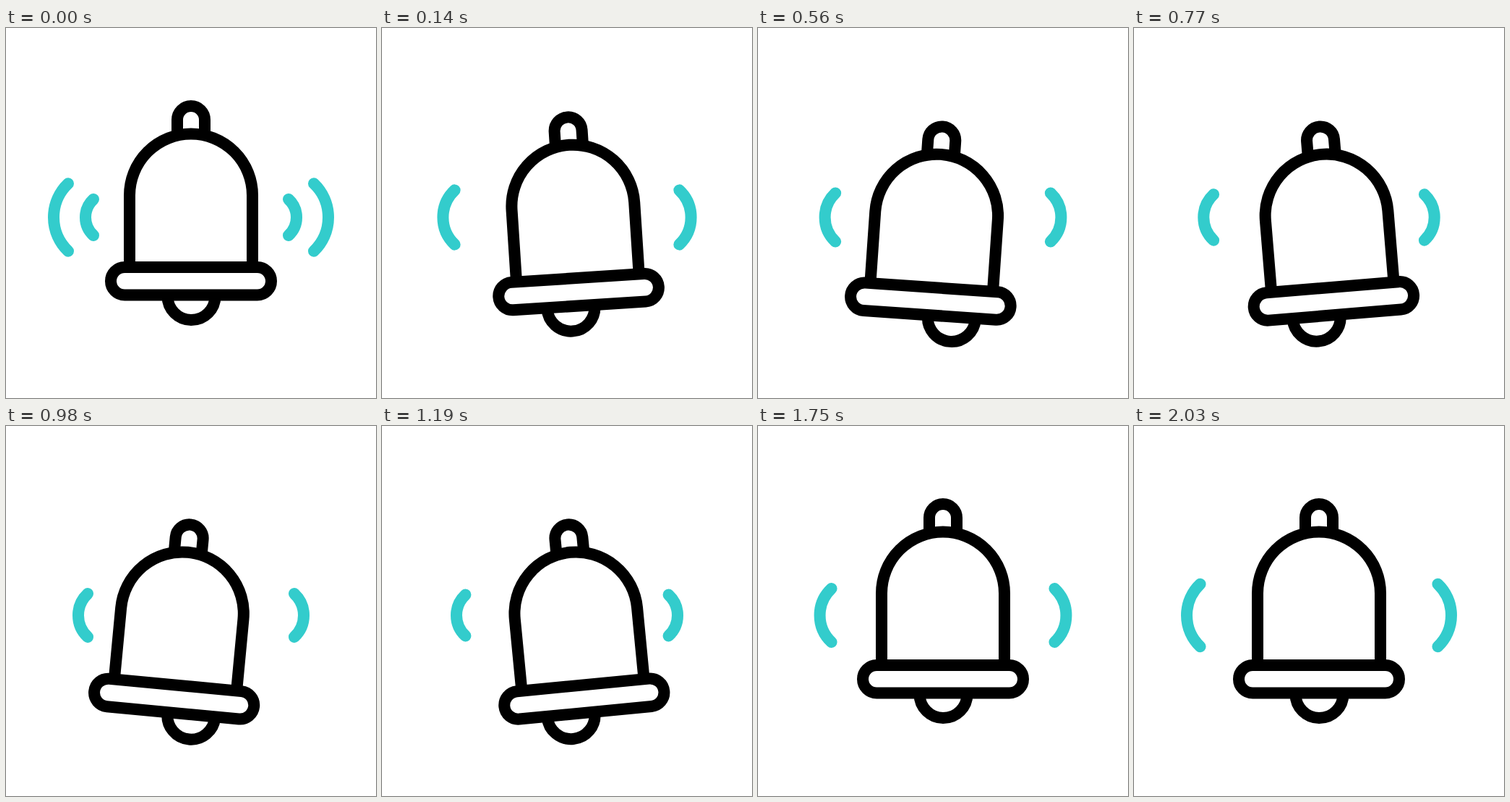
Animation, 512 px wide and 512 px high, one loop 2100 ms. Source, as an HTML page:

```html
<!DOCTYPE html>
<html lang="en">
<head>
<meta charset="utf-8">
<title>Ringing bell</title>
<style>
  html, body { margin: 0; width: 100%; height: 100%; overflow: hidden; background: #fff; }
  svg { display: block; width: 100%; height: 100%; }
</style>
</head>
<body>
<svg viewBox="0 0 512 512" fill="none" stroke-width="16">
  <path id="waves" stroke="#33cccc" stroke-linecap="round"/>
  <g id="bell" stroke="#000">
    <path id="clapper" d="M223.5 369V371A33 33 0 0 0 289.5 371V369"/>
    <path d="M237 147V127A19 19 0 0 1 275 127V147"/>
    <path d="M171 331V231.500A85 85 0 0 1 341 231.500V331"/>
    <rect x="145" y="331" width="222" height="38.500" rx="19.250"/>
  </g>
</svg>
<script>
const STEP = 70, STEPS = 30, TRAVEL = 44;
const byId = id => document.getElementById(id);
const bell = byId('bell'), clapper = byId('clapper'), waves = byId('waves');

// Tracks are [step, value] keys.
const drop = [[0, 0], [3.8, 28.5], [21.1, 28.5], [24.7, 0]];
const swing = [[0, 0], [3.3, -5.6], [7.2, 5.6], [10.4, -5.6], [13.7, 5.6],
  [17.2, -5.6], [20.9, 5.6], [25, 0]];
const slide = [[0, 0], [4.2, -27], [7.6, 32], [11, -26], [14.4, 27], [17.8, -28], [25, 0]];
const spread = [[0, 0], [5, 64], [8, 105.4], [14, 186], [17, 227], [20, 264], [22, 290],
  [29, 389], [30, 396]];

const linear = u => u;
const smooth = u => (1 - Math.cos(Math.PI * u)) / 2;

function sample(track, t, ease = smooth) {
  const next = track.findIndex(key => key[0] > t);
  if (next < 0) return track[track.length - 1][1];
  const [t0, a] = track[next - 1], [t1, b] = track[next];
  return a + (b - a) * ease((t - t0) / (t1 - t0));
}

// A mirrored pair of arcs, moved outward by q.
function arcPair(q) {
  const k = q / TRAVEL;
  const sag = 11 + 9 * k, half = 25 + 21.7 * k;
  const r = (half * half + sag * sag) / (2 * sag);
  const x = 110 - q + sag;
  const arc = (px, sweep) =>
    `M${px} ${262 - half}A${r} ${r} 0 0 ${sweep} ${px} ${262 + half}`;
  return arc(x, 0) + arc(512 - x, 1);
}

function draw(ms) {
  const t = Math.floor(ms / STEP) % STEPS;
  bell.setAttribute('transform',
    `translate(0 ${sample(drop, t)}) rotate(${sample(swing, t)} 256 102)`);
  clapper.setAttribute('transform', `translate(${sample(slide, t)} 0)`);
  const q = sample(spread, t, linear) % TRAVEL;
  waves.setAttribute('d', arcPair(q) + (q < 0.1 ? arcPair(TRAVEL) : ''));
}

const start = performance.now();
function tick() {
  draw(performance.now() - start);
  requestAnimationFrame(tick);
}
tick();
</script>
</body>
</html>
```
